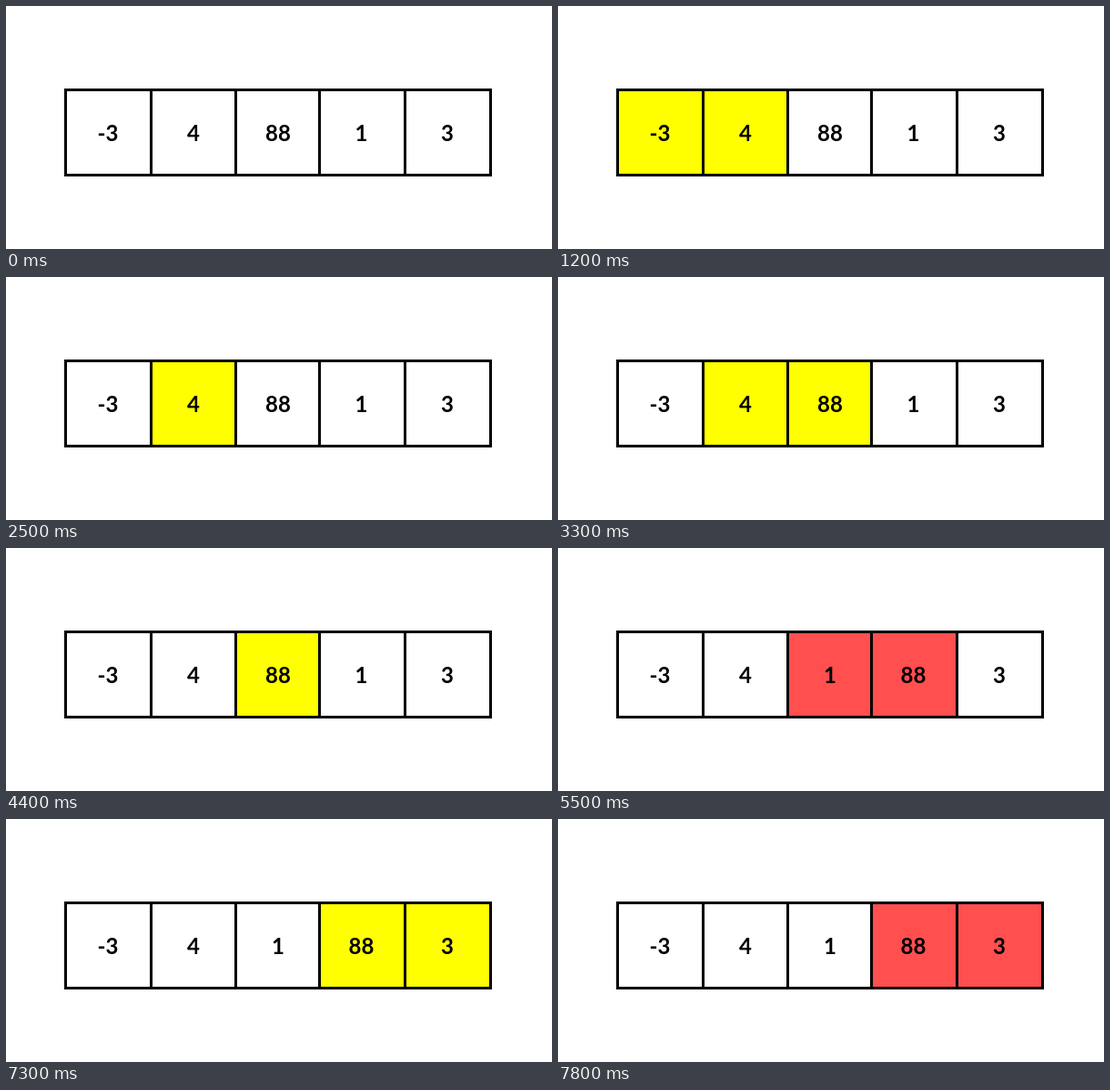
Animation, 600 px wide and 268 px high, one loop 8000 ms. Source, as an HTML page with a canvas:

```html
<!DOCTYPE html>
<html lang="en">
<head>
<meta charset="utf-8">
<title>Bubble sort</title>
<style>
  html, body { margin: 0; width: 100%; height: 100%; overflow: hidden; background: #fff; }
  canvas { display: block; }
</style>
</head>
<body>
<canvas id="stage" width="600" height="268"></canvas>
<script>
const ctx = document.getElementById('stage').getContext('2d');
const LOOP = 8000;
const YELLOW = '#ffff00', RED = '#ff4f4f';
const LINE = 3, TOP = 91, BOTTOM = 188;
const edges = [64, 158, 251, 343, 437, 531];   // left side of each vertical line
const centers = [112, 206, 299, 390.5, 485];
const BASELINE = 149;

// Each step: start time, highlighted cells, colour
const steps = [
  [0, []],
  [600, [0], YELLOW],
  [1200, [0, 1], YELLOW],
  [1900, []],
  [2500, [1], YELLOW],
  [3100, [1, 2], YELLOW],
  [3800, []],
  [4300, [2], YELLOW],
  [4900, [2, 3], RED],
  [6100, []],
  [6600, [3], YELLOW],
  [7200, [3, 4], YELLOW],
  [7800, [3, 4], RED]
];
const SWAP_TIME = 5500;

function draw(time) {
  const [, cells, color] = steps.findLast(([start]) => start <= time);
  const values = time < SWAP_TIME ? ['-3', '4', '88', '1', '3'] : ['-3', '4', '1', '88', '3'];

  ctx.fillStyle = '#fff';
  ctx.fillRect(0, 0, 600, 268);

  ctx.fillStyle = color || '#fff';
  for (const i of cells) {
    ctx.fillRect(edges[i], TOP, edges[i + 1] - edges[i], BOTTOM - TOP);
  }

  ctx.fillStyle = '#000';
  for (const x of edges) ctx.fillRect(x, TOP, LINE, BOTTOM - TOP);
  for (const y of [TOP, BOTTOM - LINE]) ctx.fillRect(edges[0], y, edges[5] + LINE - edges[0], LINE);

  ctx.font = 'bold 24px Lato, sans-serif';
  ctx.textAlign = 'center';
  values.forEach((value, i) => ctx.fillText(value, centers[i], BASELINE));
}

function tick() {
  draw(performance.now() % LOOP);
  requestAnimationFrame(tick);
}
tick();
</script>
</body>
</html>
```
